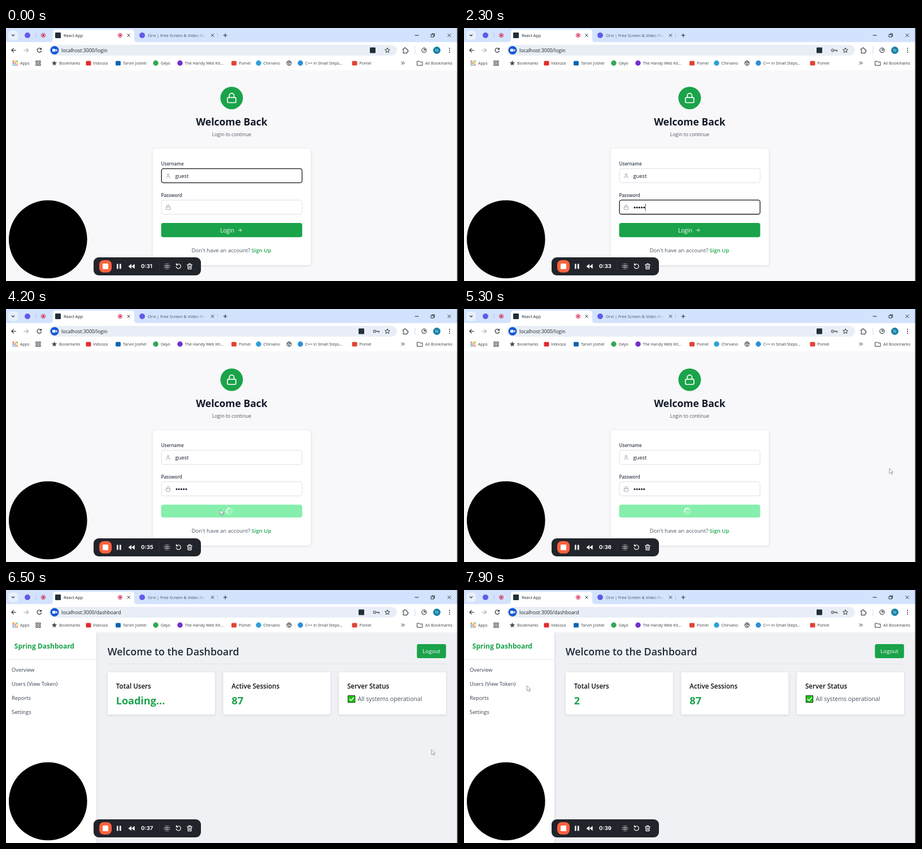
Recreate the animation shown at these times as an HTML page. Size 800x449 px, loop 8000 ms.

```html
<!DOCTYPE html>
<html lang="en">
<head>
<meta charset="utf-8">
<title>Login demo</title>
<style>
html, body { margin: 0; width: 100%; height: 100%; overflow: hidden; background: #fff; }
svg { display: block; width: 100vw; height: 100vh; }
text { font-family: "Open Sans", "Noto Sans", sans-serif; white-space: pre; }
.card { filter: drop-shadow(0 1.5px 2px rgba(0, 0, 0, .13)); }
.line { fill: none; stroke-linecap: round; stroke-linejoin: round; }
</style>
</head>
<body>
<svg id="stage" viewBox="0 0 800 449"></svg>
<script>
const LOOP = 8000, STEP = 100;
const GREEN = '#1aa34a', INK = '#1f2328', GREY = '#5f6368', ICON = '#8b93a0';

// Markup helpers
const text = (x, y, size, str, fill = INK, weight = 400, extra = '') =>
  `<text x="${x}" y="${y}" font-size="${size}" fill="${fill}" font-weight="${weight}" ${extra}>${str}</text>`;
const rect = (x, y, w, h, fill, r = 0, extra = '') =>
  `<rect x="${x}" y="${y}" width="${w}" height="${h}" rx="${r}" fill="${fill}" ${extra}/>`;
const dot = (x, y, r, fill, extra = '') => `<circle cx="${x}" cy="${y}" r="${r}" fill="${fill}" ${extra}/>`;
const ring = (x, y, r, stroke, w = 1) => dot(x, y, r, 'none', `stroke="${stroke}" stroke-width="${w}"`);
const line = (d, stroke = GREY, w = 1, extra = '') =>
  `<path class="line" d="${d}" stroke="${stroke}" stroke-width="${w}" ${extra}/>`;
const shape = (d, fill, extra = '') => `<path d="${d}" fill="${fill}" ${extra}/>`;
const group = (id, body, extra = '') => `<g id="${id}" ${extra}>${body}</g>`;
const mid = 'text-anchor="middle"';
const cross = (x, y, r, color = INK) => line(`M${x - r} ${y - r}l${2 * r} ${2 * r}m0 ${-2 * r}l${-2 * r} ${2 * r}`, color, .9);

// Outline icons on a 24-unit grid, centred on x, y
const PADLOCK = 'M5 11h14a2 2 0 0 1 2 2v7a2 2 0 0 1-2 2H5a2 2 0 0 1-2-2v-7a2 2 0 0 1 2-2M7 11V7a5 5 0 0 1 10 0v4';
const PERSON = 'M19 21v-2a4 4 0 0 0-4-4H9a4 4 0 0 0-4 4v2M8 7a4 4 0 1 0 8 0a4 4 0 1 0-8 0';
const ARROW = 'M5 12h14M12 5l7 7-7 7';
const icon = (d, x, y, size, color) =>
  line(d, color, 2, `transform="translate(${x} ${y}) scale(${size / 24}) translate(-12 -12)"`);

const star = (x, y, r, attrs) => {
  const pts = Array.from({ length: 10 }, (_, i) => {
    const a = i * Math.PI / 5 - Math.PI / 2, q = i % 2 ? r * .45 : r;
    return `${(x + q * Math.cos(a)).toFixed(2)},${(y + q * Math.sin(a)).toFixed(2)}`;
  });
  return `<polygon points="${pts.join(' ')}" ${attrs}/>`;
};
const dots = (x, y, gap, n, radius, color) =>
  Array.from({ length: n * n }, (_, i) => {
    const col = i % n, row = i / n | 0;
    return dot(x + col * gap, y + row * gap, radius(col, row), color(i));
  }).join('');
const record = (x, y) => ring(x, y, 3.6, '#d3264f') + dot(x, y, 2, '#d3264f');

function tabStrip() {
  return rect(0, 0, 800, 25, '#d3e3fd')
    + rect(4, 4.5, 17, 17, '#e8f0fe', 5) + line('M10.3 11.8l2.2 2.2 2.2-2.2', INK, 1.1)
    + dot(38, 13, 5, '#6558e8') + line('M53 9v8M374.5 9v8', '#a9bfe4', .8)
    + record(66, 13)
    + shape('M78 25q5 0 5-5V8q0-5 5-5h134q5 0 5 5v12q0 5 5 5z', '#fff')
    + rect(87, 8, 10, 10, '#20303a', 1) + text(102, 15.8, 7.3, 'React App')
    + record(202, 13) + cross(217, 13, 2.3)
    + dot(241, 13, 5, '#6558e8')
    + text(251, 15.8, 7.3, 'Orvi | Free Screen &amp; Video Rec', 'url(#fade)')
    + cross(365.5, 13, 2.3) + line('M388 10v6M385 13h6', INK)
    + line('M724 13h6', INK) + line('M752.5 11.5h4.5v4.5h-4.5zM754 11.5v-1.5h4.5v4.5h-1.5', INK, .9)
    + cross(784.5, 13, 2.7);
}

function toolbar() {
  return rect(0, 25, 800, 50, '#fff')
    + line('M17.5 39.5h-7.5m3.3-3.3l-3.3 3.3 3.3 3.3', INK, 1.1)
    + line('M32 39.5h7.5m-3.3-3.3l3.3 3.3-3.3 3.3', '#a5a9ae', 1.1)
    + line('M62 37.5a3.7 3.7 0 1 0 .4 3M62.4 35.5v2.5h-2.5', INK, 1.1)
    + rect(76, 30, 616, 19, '#e9eef6', 9.5)
    + dot(86, 39.5, 7.5, '#1558d6') + rect(82, 37, 5.5, 5, '#fff', 1) + shape('M88 39l2.5-1.7v4.4l-2.5-1.7z', '#fff')
    + `<text id="url" x="98" y="42.6" font-size="8.7" fill="${INK}"></text>`
    + group('badge', rect(644, 34.5, 10, 10, '#20303a', 1))
    + group('key', ring(652.5, 39.5, 2.3, GREY, 1.1) + dot(652.5, 39.5, .8, GREY) + line('M655 39.5h5.5v1.8m-2-1.8v1.5', GREY, 1.3))
    + star(675, 39.7, 4.6, `fill="none" stroke="${INK}" stroke-width=".9" stroke-linejoin="round"`)
    + line('M703 37h2v-1.3a1.2 1.2 0 0 1 2.4 0v1.3h2.6v2.6h1a1.2 1.2 0 0 1 0 2.4h-1v2.5h-7v-2.5a1.3 1.3 0 0 0 0-2.6z', INK)
    + line('M724 33.5v12', '#c8dcfb')
    + ring(740, 39.5, 4.2, INK) + line('M738.2 41.3l3.6-3.6m-2.6 0h2.6v2.6', INK, .9)
    + dot(762.5, 39.5, 6.5, '#1681a8') + text(762.5, 42, 7, 'N', '#fff', 400, mid)
    + [36, 39.5, 43].map(y => dot(785, y, .9, INK)).join('');
}

function bookmarks() {
  const rainbow = ['#e94235', '#fbbc04', '#34a853', '#4285f4'];
  const marks = [
    [146, 154, 'Vidooza', '#e32b2b', 'box'], [198.5, 207, 'Tarvin Joshel', '#0a66b2', 'box'],
    [265, 274, 'Geyo', '#34a853'], [308, 316.5, 'The Handy Web Kit...', '#7130c9'],
    [403.5, 412, 'Pomel', '#e14335', 'box'], [447, 455.5, 'Chirvano', '#2da0dc'],
    [521, 529.5, 'C++ in Small Steps...', '#2c8fd8'], [617, 625.5, 'Pomel', '#e14335', 'box']
  ];
  return dots(12.8, 59, 3.3, 3, () => 1.2, i => rainbow[i % 4]) + text(25, 65, 7.1, 'Apps', '#3c4043')
    + [[53, 58.5], [58, 58.5], [53, 63.5], [58, 63.5]].map(([x, y]) =>
        rect(x, y, 3, 3, 'none', 0, `stroke="${INK}" stroke-width=".9"`)).join('')
    + star(85.5, 62.5, 5, 'fill="#4a4d51"') + text(94, 65, 7.1, 'Bookmarks', '#3c4043')
    + marks.map(([ix, tx, name, color, kind]) =>
        (kind ? rect(ix - 4.5, 58.5, 9, 8, color, 1.5) : dot(ix, 62.3, 4.7, color))
        + text(tx, 65, 7.1, name, '#3c4043')).join('')
    + ring(501, 62.3, 3.9, '#4a4d51', 1.2) + line('M498 61l2.5 1.5 1 2.5M500.5 59l1 2 2.5.5', '#4a4d51', 1.4)
    + line('M700 60l2.2 2.2-2.2 2.2m3-4.4l2.2 2.2-2.2 2.2', INK)
    + line('M728 59h3.5l1.2 1.3h4.3v6h-9z', INK, .9) + text(742, 65, 7.2, 'All Bookmarks', '#3c4043');
}

function loginPage() {
  const field = (id, y) => rect(275.2, y, 248.8, 25.1, '#fff', 3.6, `id="${id}"`);
  const head = dot(399.4, 124.2, 20, GREEN) + icon(PADLOCK, 399.4, 124.2, 20, '#fff')
    + text(399.4, 173.2, 17.5, 'Welcome Back', '#111827', 700, mid)
    + text(399.4, 191.5, 8.55, 'Login to continue', '#4b5563', 400, mid);
  const form = text(274.5, 244, 8.05, 'Username', '#374151', 600) + field('userField', 249.6)
    + icon(PERSON, 287, 262.3, 10, ICON)
    + text(299.5, 266, 9.3, 'guest', '#111827')
    + text(274.5, 299.8, 8.05, 'Password', '#374151', 600) + field('passField', 305.4)
    + icon(PADLOCK, 287, 318, 10, ICON)
    + group('bullets', Array.from({ length: 5 }, (_, i) => dot(302 + 4.2 * i, 318.6, 1.55, '#111827')).join(''))
    + rect(0, 311.5, .8, 13, '#111827', 0, 'id="caret"');
  return rect(0, 75, 800, 374, '#f8f8fa')
    + '<rect id="loginCard" class="card" x="259.7" width="279.7" rx="5" fill="#fff"/>'
    + group('upper', head + form)
    + '<rect id="button" x="274.6" width="249.7" rx="3.8"/>'
    + group('label', text(379, 362.8, 9.9, 'Login', '#fff', 500) + icon(ARROW, 414, 358.8, 10, '#fff'))
    + group('spinner', dot(0, 0, 5.2, '#fff', 'fill-opacity=".15" stroke="#fff" stroke-opacity=".25" stroke-width="2"')
        + line('M-3.9 3.4a5.200 5.200 0 0 1 3.9-8.6', '#fff', 2, 'opacity=".75"'))
    + group('signup', text(328.5, 398, 9.6, "Don't have an account?", '#4b5563')
        + text(434.5, 398, 9.6, 'Sign Up', GREEN, 600));
}

function dashboard() {
  const card = (x, title) => rect(x, 146, 190, 75, '#fff', 2.5, 'class="card"') + text(x + 15, 174.7, 11.6, title, '#0b0d10', 600);
  return rect(0, 75, 800, 374, '#f0f1f5')
    + rect(0, 75, 160, 374, '#fff', 0, 'class="card"')
    + text(14.8, 104.3, 12, 'Spring Dashboard', GREEN, 700)
    + line('M0 123.7h160', '#e2e5ea', .8)
    + ['Overview', 'Users (View Token)', 'Reports', 'Settings'].map((s, i) =>
        text(10, 145.3 + 25 * i, 9.35, s, '#374151')).join('')
    + text(179.8, 115.8, 17.8, 'Welcome to the Dashboard', '#1f2937', 600)
    + rect(727.3, 96, 51.5, 25, GREEN, 3) + text(753, 112.4, 9.7, 'Logout', '#fff', 500, mid)
    + line('M180 131.3h599', '#dfe2e7', .8)
    + card(179.8, 'Total Users') + `<text id="users" x="194.8" y="203" font-size="18" font-weight="700" fill="${GREEN}"></text>`
    + card(384.3, 'Active Sessions') + text(399.3, 203, 18.5, '87', GREEN, 700)
    + card(589, 'Server Status')
    + rect(605.3, 187.3, 12.4, 12.4, '#16c60c', .5, 'stroke="#1d2b1d" stroke-width="1"')
    + line('M608 193.5l2.7 2.7 4.6-5.2', '#fff', 1.5)
    + text(622.5, 197, 10.55, 'All systems operational', '#4b5563');
}

function recorder() {
  const inner = n => n > 0 && n < 3;
  const blurDot = (col, row) => inner(col) && inner(row) ? 1.1 : inner(col) || inner(row) ? .75 : .3;
  return dot(74.3, 375, 69.3, '#000')
    + rect(155, 407, 190, 32, '#22242b', 9)
    + rect(165, 412, 22, 22, '#ff623e', 8) + rect(171, 418, 10, 10, '#fff', 1.5)
    + rect(196, 418.5, 2.7, 9, '#fff', .8) + rect(201, 418.5, 2.7, 9, '#fff', .8)
    + shape('M222 418.7v8.6l-5.5-4.3zM227.7 418.7v8.6l-5.5-4.3z', '#fff')
    + '<text id="timer" x="239" y="426.4" font-size="9.6" font-weight="700" fill="#fff" style="font-family:Inter,sans-serif"></text>'
    + line('M271 415v16', '#33363e', .8)
    + dots(280.5, 418.5, 3, 4, blurDot, () => '#fff')
    + line('M302 420.3a4.1 4.1 0 1 1-.8 3.3M301.5 417.8v2.8h2.8', '#fff', 1.2)
    + line('M320.5 420h9m-6 0v-1.7h3v1.7m-4.8 0l.5 7.7h5.6l.5-7.7M324 422.5v3m2 0v-3', '#fff', 1.2);
}

const stage = document.getElementById('stage');
stage.innerHTML = `<defs><linearGradient id="fade" gradientUnits="userSpaceOnUse" x1="335" x2="355">
    <stop stop-color="#44536b"/><stop offset="1" stop-color="#44536b" stop-opacity="0"/></linearGradient></defs>`
  + group('login', loginPage()) + group('dash', dashboard())
  + tabStrip() + toolbar() + bookmarks() + rect(798.5, 0, 1.5, 449, '#16181c') + recorder()
  + group('arrow', shape('M0 0v9.2l2.2-2 1.5 3.4 1.6-.7-1.5-3.3h3z', '#fff', 'stroke="#70747b" stroke-width=".7" stroke-linejoin="round"'))
  + group('hand', shape('M377.2 357a1 1 0 0 1 2 0v3.2l3.6.8q1 .3.9 1.4l-.6 3.8h-4.6l-2.7-3.4q-.3-1.3 1.4-.5z', '#fff', 'stroke="#30343a" stroke-width=".6"'));

const el = Object.fromEntries([...stage.querySelectorAll('[id]')].map(n => [n.id, n]));
const show = (node, on) => node.setAttribute('display', on ? 'inline' : 'none');
const set = (node, attrs) => Object.entries(attrs).forEach(([k, v]) => node.setAttribute(k, v));
const ramp = (t, a, b) => Math.min(1, Math.max(0, (t - a) / (b - a)));
const ease = p => p * p * (3 - 2 * p);
const move = (node, x, y) => node.setAttribute('transform', `translate(${x} ${y})`);
const bezier = (a, b, c, p) => a * (1 - p) ** 2 + 2 * b * p * (1 - p) + c * p * p;

const KEYS = [1100, 1400, 1800, 2100, 2300];
const FOCUS = 100, HOVER = 3100, CLICK = 3700, LOADING = 4200, LOADED = 6500, COUNTED = 6700;

function cursorAt(t) {
  const out = ease(ramp(t, 4200, 5000)), back = ease(ramp(t, 7000, 7900));
  return back > 0
    ? [bezier(753, 430, 111.5, back), bezier(283, 35, 170, back)]
    : [379 + 374 * out, 356 - 73 * out];
}

function draw(t) {
  const loading = t >= LOADING, loaded = t >= LOADED;
  show(el.login, !loaded);
  show(el.dash, loaded);
  el.url.textContent = 'localhost:3000/' + (loaded ? 'dashboard' : 'login');
  el.timer.textContent = '0:' + (31 + Math.floor((t + 300) / 1000));
  el.users.textContent = t < COUNTED ? 'Loading...' : '2';

  const typed = KEYS.filter(k => t >= k).length;
  move(el.badge, typed ? -20 : 0, 0);
  show(el.key, typed);
  [...el.bullets.children].forEach((b, i) => show(b, i < typed));

  const inPassword = t >= FOCUS && t < CLICK;
  const border = on => ({ stroke: on ? '#15181d' : '#d5d8de', 'stroke-width': on ? 1.3 : .8 });
  set(el.userField, border(t < FOCUS));
  set(el.passField, border(inPassword));
  const lastKey = typed ? KEYS[typed - 1] : FOCUS;
  show(el.caret, inPassword && (t - lastKey) % 1100 < 600);
  el.caret.setAttribute('x', 299.7 + 4.2 * typed);

  // The spinner is shorter than the label, so the centred form closes up.
  const dy = loading ? 1.2 : 0;
  move(el.upper, 0, dy);
  move(el.signup, 0, -dy);
  set(el.loginCard, { y: 214 + dy, height: 207 - 2 * dy });
  set(el.button, {
    y: 346.1 + dy, height: 25.2 - 2 * dy,
    fill: loading ? '#86efac' : t >= HOVER ? '#18803d' : GREEN
  });
  show(el.label, !loading);
  show(el.spinner, loading);
  el.spinner.setAttribute('transform', `translate(395.4 358.8) rotate(${(Math.min(t, 5500) - LOADING) * .36})`);

  show(el.hand, t >= HOVER && !loading);
  show(el.arrow, loading);
  move(el.arrow, ...cursorAt(t));
}

const start = performance.now();
function tick() {
  const t = (performance.now() - start) % LOOP;
  draw(Math.floor(t / STEP) * STEP);
  requestAnimationFrame(tick);
}
tick();
</script>
</body>
</html>
```
